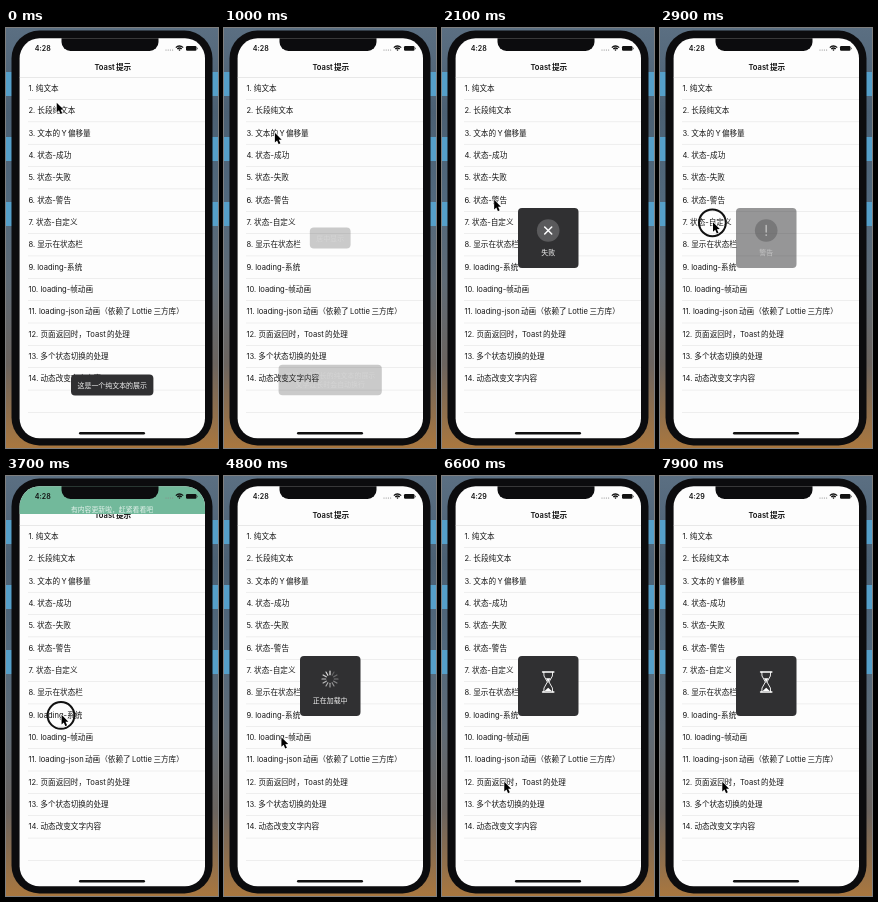
Animation of 212 by 420 pixels, one loop 8000 ms. Source, as an HTML page with a canvas:

```html
<!DOCTYPE html>
<html lang="zh-CN">
<head>
<meta charset="utf-8">
<style>
html, body { margin: 0; width: 100%; height: 100%; overflow: hidden; }
canvas { display: block; width: 212px; height: 420px; }
</style>
</head>
<body>
<canvas></canvas>
<script>
const LOOP = 8000, STEP = 100, TAU = Math.PI * 2;
const FONT = 'Inter, "Noto Sans CJK SC", "Noto Sans CJK", sans-serif';
const DARK = '#303032', BODY = '#0c0c0e';
const canvas = document.querySelector('canvas');
const g = canvas.getContext('2d');
const dpr = window.devicePixelRatio || 1;
canvas.width = 212 * dpr;
canvas.height = 420 * dpr;

const rows = ['纯文本', '长段纯文本', '文本的Y偏移量', '状态-成功', '状态-失败', '状态-警告',
  '状态-自定义', '显示在状态栏', 'loading-系统', 'loading-帧动画',
  'loading-json动画（依赖了Lottie三方库）', '页面返回时，Toast的处理',
  '多个状态切换的处理', '动态改变文字内容'];

// The pointer clicks the rows in turn; every other motion follows from these times.
const clicks = [-350, 250, 800, 1250, 1650, 2200, 2750, 3150, 3650, 4900, 5500, 6300];

// What each row shows; the status bar banner is painted with the page.
const BANNER = 7;
const overlays = [
  () => toast(357, '这是一个纯文本的展示'),
  () => toast(352, '这是一段很长的纯文本的展示', '文字过长时会自动换行'),
  () => toast(210, '居中显示'),
  () => status('成功', '✓'),
  () => status('失败', '✕'),
  () => status('警告', '!'),
  () => status('自定义', '✓'),
  null,
  spinner,
  spinner,
  hourglass
];

const clamp = v => Math.max(0, Math.min(1, v));
const ease = v => v * v * (3 - 2 * v);
const rowY = i => 60.2 + i * 22.33;

// Opacity of the overlay of row i: in after its click, out after the next one.
function shown(i, t) {
  const end = overlays[i + 1] === undefined ? Infinity : clicks[i + 1] + 250;
  return clamp(Math.min(t - clicks[i] - 150, end - t) / 200);
}

// Thin gap between Latin and Chinese letters.
const spaced = s => s.replace(/([a-z])(?=[\u4e00-\u9fff])|([\u4e00-\u9fff])(?=[A-Z])|([A-Z])(?=[\u4e00-\u9fff])/gi, '$&\u2009');

function box(x, y, w, h, r, color) {
  g.fillStyle = color;
  g.beginPath();
  g.roundRect(x, y, w, h, r);
  g.fill();
}

function disc(x, y, r, color) {
  g.fillStyle = color;
  g.beginPath();
  g.arc(x, y, r, 0, TAU);
  g.fill();
}

function line(points, color, width) {
  g.strokeStyle = color;
  g.lineWidth = width;
  g.beginPath();
  points.forEach(p => g.lineTo(...p));
  g.stroke();
}

function text(s, x, y, size, color, align = 'center', weight = 400) {
  g.font = `${weight} ${size}px ${FONT}`;
  g.textAlign = align;
  g.textBaseline = 'alphabetic';
  g.fillStyle = color;
  g.fillText(s, x, y + size * 0.37);
}

function desktop() {
  const sky = g.createLinearGradient(0, 0, 0, 420);
  ['#5b6f82', '#4b6073', '#51687c', '#5f6b76', '#6b645f', '#a9773f']
    .forEach((c, i) => sky.addColorStop(i / 5, c));
  g.fillStyle = sky;
  g.fillRect(0, 0, 212, 420);
  g.fillStyle = '#559fc9';
  for (let y = 44; y < 200; y += 65) g.fillRect(0, y, 212, 24);
}

function page() {
  text(spaced('Toast提示'), 106.8, 39.2, 7.6, '#111', 'center', 600);
  g.fillStyle = '#d2d2d2';
  g.fillRect(13, 49, 187, 0.5);
  g.fillStyle = '#dedede';
  for (let i = 1; i < 16; i++) g.fillRect(22, 48.9 + i * 22.35, 178, 0.5);
  rows.forEach((s, i) => text(`${i + 1}. ${spaced(s)}`, 22.4, rowY(i), 7.6, '#181818', 'left'));
}

function banner(t) {
  const y = 30 * ease(shown(BANNER, t)) - 30;
  box(13, 8 + y, 187, 30, 0, '#72b99b');
  text('有内容更新啦，赶紧看看吧', 106, 33.5 + y, 6.85, '#e4f2ec');
}

function statusBar(t) {
  text(t < clicks[10] ? '4:28' : '4:29', 36.8, 20.3, 7.1, '#111', 'center', 600);
  for (let i = 0; i < 4; i++) disc(160 + i * 2.2, 22, 0.6, '#888');
  g.lineCap = 'butt';
  g.strokeStyle = '#111';
  g.lineWidth = 1.3;
  for (const r of [1, 3, 5]) {
    g.beginPath();
    g.arc(173.5, 23, r, -Math.PI * 0.76, -Math.PI * 0.24);
    g.stroke();
  }
  box(180, 18, 10.5, 4.8, 1.2, '#111');
  box(191, 19.5, 0.8, 1.8, 0.4, '#555');
}

function toast(y, ...lines) {
  g.font = `400 6.94px ${FONT}`;
  const w = Math.max(...lines.map(s => g.measureText(s).width)) + 13;
  const h = 11.5 + lines.length * 9.5;
  box(106.2 - w / 2, y - h / 2, w, h, 4, DARK);
  lines.forEach((s, i) => text(s, 106.2, y + (i - (lines.length - 1) / 2) * 9.5, 6.94, '#f5f5f5'));
}

function hud(label = '') {
  box(76, 180, 60.5, 60, 4, DARK);
  text(label, 106.2, 224, 6.94, '#f2f2f2');
}

function status(label, sign) {
  hud(label);
  disc(106.2, 202.5, 11.3, '#5a5a5c');
  g.save();
  g.translate(106.2, 202.5);
  g.lineCap = g.lineJoin = 'round';
  if (sign === '✕') {
    line([[-3.5, -3.5], [3.5, 3.5]], '#fff', 1.5);
    line([[3.5, -3.5], [-3.5, 3.5]], '#fff', 1.5);
  } else if (sign === '✓') {
    line([[-4, 0], [-1, 3], [4.5, -3]], '#fff', 1.5);
  } else {
    line([[0, -5], [0, 1.5]], '#fff', 1.5);
    disc(0, 4.6, 0.9, '#fff');
  }
  g.restore();
}

function spinner(t) {
  hud('正在加载中');
  g.save();
  g.translate(106, 203);
  g.lineCap = 'round';
  for (let i = 0; i < 12; i++) {
    const age = (t / 100 - i + 12) % 12;
    line([[0, -4.3], [0, -8]], `rgba(255,255,255,${0.9 - age * 0.06})`, 1.2);
    g.rotate(TAU / 12);
  }
  g.restore();
}

// Turns over, then the sand runs down.
function hourglass(t) {
  const p = (t - 4650) / 1300 % 1;
  const turn = ease(clamp(p / 0.3)), run = clamp((p - 0.3) / 0.7);
  hud();
  g.save();
  g.translate(106.2, 206);
  g.rotate(Math.PI * (turn - 1));
  g.lineCap = g.lineJoin = 'round';
  for (const s of [-1, 1]) {
    line([[-5.7, 10 * s], [5.7, 10 * s]], '#fff', 1.3);
    for (const m of [-1, 1])
      line([[4.4 * m, 10 * s], [4.2 * m, 6 * s], [0.8 * m, 0]], '#fff', 0.9);
  }
  const pile = 2 + 4 * run, rest = 5 - 4 * run;
  g.fillStyle = '#fff';
  g.beginPath();
  g.moveTo(-3.6, 9);
  g.lineTo(3.6, 9);
  g.lineTo(0, 9 - pile);
  g.moveTo(-rest * 0.6, -rest);
  g.lineTo(rest * 0.6, -rest);
  g.lineTo(0, 0);
  g.fill();
  g.restore();
}

function pointer(t) {
  const i = clicks.findLastIndex(c => c <= t);
  const leave = clicks[i] + 200, arrive = clicks[i + 1] - 150;
  const row = i + (i + 1 < clicks.length ? ease(clamp((t - leave) / (arrive - leave))) : 0);
  const x = 50.7 + 0.0067 * (row + 1) ** 3, y = rowY(row);
  if (t < leave) {
    g.strokeStyle = '#111';
    g.lineWidth = 2;
    g.beginPath();
    g.arc(x - 0.6, y + 0.6, 13.4, 0, TAU);
    g.stroke();
  }
  g.save();
  g.translate(x, y);
  g.beginPath();
  [[0, 0], [0, 9.6], [2.2, 7.6], [3.8, 11.3], [5.5, 10.5], [3.9, 7], [6.8, 6.8]]
    .forEach(q => g.lineTo(...q));
  g.closePath();
  g.lineJoin = 'round';
  g.strokeStyle = '#fff';
  g.lineWidth = 1.2;
  g.stroke();
  g.fillStyle = '#000';
  g.fill();
  g.restore();
}

function draw(t) {
  g.setTransform(dpr, 0, 0, dpr, 0, 0);
  desktop();
  box(5.5, 2.5, 201, 415, 28, BODY);
  g.save();
  g.beginPath();
  g.roundRect(13.6, 10.3, 185.4, 400, 20);
  g.clip();
  g.fillStyle = '#fdfdfd';
  g.fillRect(13, 10, 187, 401);
  page();
  banner(t);
  statusBar(t);
  box(55.5, 0, 97, 23, 9, BODY);
  box(73, 404, 66, 2.4, 1.2, '#111');
  g.restore();
  overlays.forEach((paint, i) => {
    g.globalAlpha = shown(i, t);
    if (paint && g.globalAlpha) paint(t);
  });
  g.globalAlpha = 1;
  pointer(t);
}

const start = performance.now();
function tick() {
  draw(Math.floor((performance.now() - start) % LOOP / STEP) * STEP);
  requestAnimationFrame(tick);
}
tick();
</script>
</body>
</html>
```
